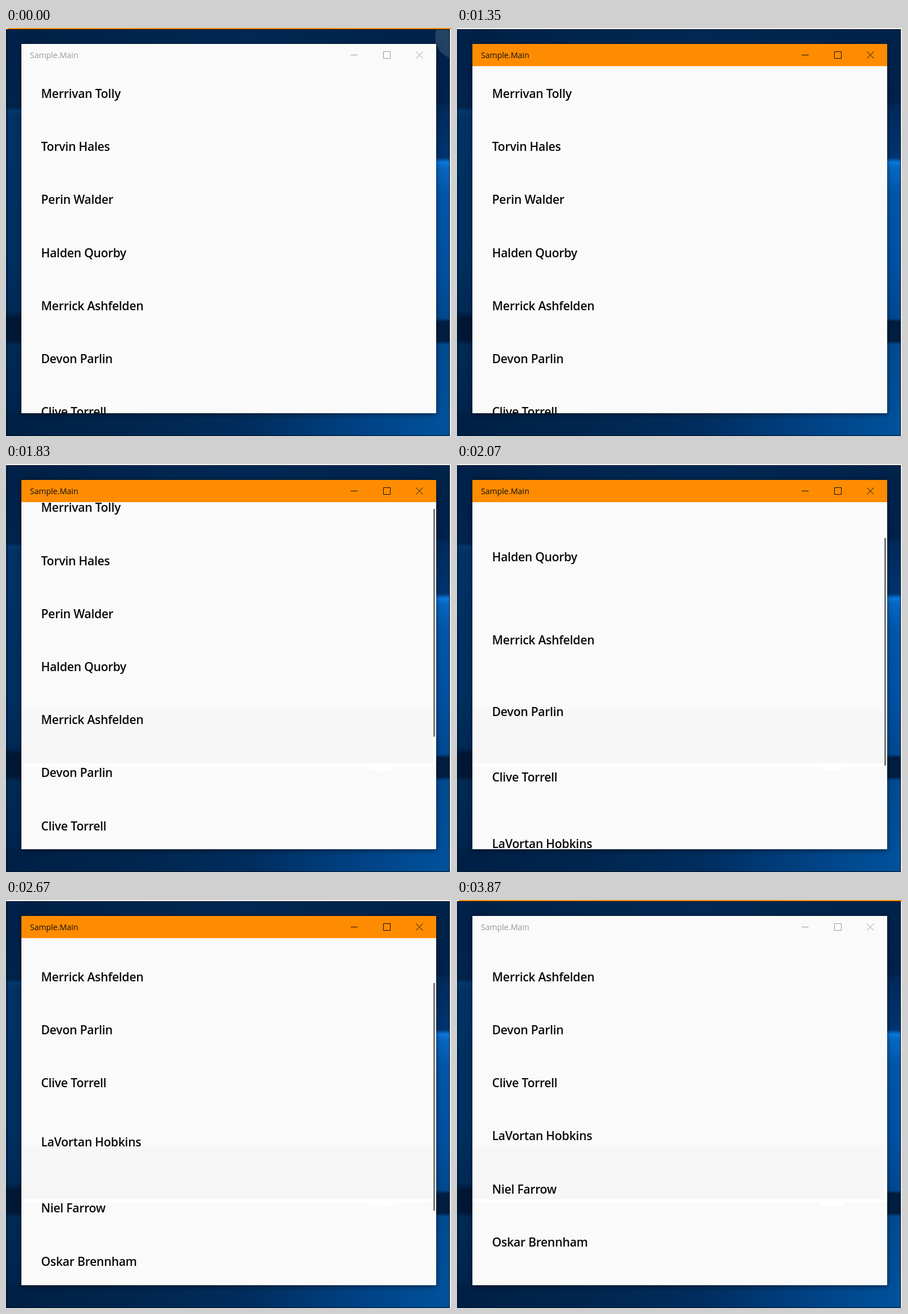
Recreate the animation shown at these times as an HTML page. Size 781x717 px, loop 3930 ms.

```html
<!DOCTYPE html>
<html lang="en">
<head>
<meta charset="utf-8">
<title>Staggered list scroll</title>
<style>
  html, body { margin: 0; width: 100%; height: 100%; overflow: hidden; }
  body { font-family: "Open Sans", "Noto Sans", sans-serif; background: #f0f0f0; }
  div, svg { position: absolute; }
  #stage { width: 781px; height: 717px; overflow: hidden; background: #f0f0f0; }
  #desk {
    left: 0; top: 2px; width: 779px; height: 715px; overflow: hidden;
    background: linear-gradient(90deg, #001f44, #00254f 30%, #002852 55%, #00214a);
  }
  #left {
    left: 0; top: 0; width: 27px; height: 715px;
    background: linear-gradient(#00214a, #00244c 138px, #04386f 143px, #003264 155px,
      #002f60 400px, #002a56 495px, #001734 508px, #001836 546px, #002a55 556px, #00224a);
  }
  #right {
    left: 755px; top: 0; width: 24px; height: 715px;
    background: linear-gradient(#00234a, #00214a 128px, #002a5a 136px, #003470 226px,
      #0a78dc 234px, #0866c0 244px, #0056a8 290px, #0050a0 420px, #00488f 508px,
      #001d40 514px, #001d40 548px, #004a90 554px, #00529c);
  }
  #floor {
    left: 0; top: 675px; width: 779px; height: 40px;
    background: linear-gradient(90deg, #001f45, #00264f 30%, #002d5e 55%, #004488 82%, #00529c);
  }
  #frame { left: 2px; top: 2px; width: 775px; height: 713px; border: 1px solid #04101f; border-bottom-width: 2px; box-sizing: content-box; }
  #outer { left: 3px; top: 0; width: 778px; height: 2px; }
  #spot { left: 753px; top: -25px; width: 78px; height: 78px; border-radius: 50%; background: #fff; }
  #win {
    left: 27px; top: 28px; width: 728px; height: 649px; background: #fafafa;
    box-shadow: 0 0 1px #000c, 0 2px 9px #0008;
  }
  #bar { width: 728px; height: 39px; }
  #title { left: 15px; top: 10px; font-size: 14px; line-height: 20px; }
  #icons { left: 0; top: 0; fill: none; stroke: currentColor; }
  #list { top: 39px; width: 728px; height: 610px; overflow: hidden; }
  #press { width: 728px; height: 610px; }
  #row { top: 365px; width: 722px; height: 94px; background: #f7f7f7; }
  #gap { top: 459px; width: 728px; height: 5px; background: #fff; }
  #dip { top: 459px; left: 580px; width: 100px; height: 20px; overflow: hidden; }
  #dip div { left: 7.5px; top: -73.5px; width: 87px; height: 87px; border-radius: 50%; background: #fff; }
  .name {
    left: 34.5px; top: 33px; white-space: pre; color: #0a0a0a;
    font-size: 21px; font-weight: 600; line-height: 30px; letter-spacing: -.3px;
  }
  #thumb { left: 722.5px; top: 0; width: 3px; height: 400px; background: #767676; }
</style>
</head>
<body>
<div id="stage">
  <div id="desk">
    <div id="left"></div><div id="right"></div><div id="floor"></div>
    <div id="spot"></div>
  </div>
  <div id="frame"></div>
  <div id="outer"></div>
  <div id="win">
    <div id="bar">
      <div id="title">Sample.Main</div>
      <svg id="icons" width="728" height="39">
        <path d="M578 19.5h12M635.5 13.5h12v12h-12zM692.5 13.5l12 12m0-12l-12 12"/>
      </svg>
    </div>
    <div id="list">
      <div id="press">
        <div id="row"></div><div id="gap"></div><div id="dip"><div></div></div>
      </div>
      <div id="thumb"></div>
    </div>
  </div>
</div>
<script>
const LOOP = 3930, STEP = 30, PITCH = 93.2, GLIDE = 1950;
const names = ["Merrivan Tolly", "Torvin Hales", "Perin Walder", "Halden Quorby",
  "Merrick Ashfelden", "Devon Parlin", "Clive Torrell", "LaVortan Hobkins",
  "Niel Farrow", "Oskar Brennham"];
// Lower rows follow the same glide more slowly; the last two also start later.
const rates = [1.8, 1.7, 1.6, 1.375, 1, .77, .63, .48, .65, .72];
const starts = { 8: 2235, 9: 2280 };
const glide = [52, 73, 103, 143, 179, 215, 248, 274, 296, 313, 328, 339, 346, 350, 352, 353];

const $ = id => document.getElementById(id);
const clamp = x => Math.max(0, Math.min(1, x));

const rows = names.map(text => {
  const row = document.createElement("div");
  row.className = "name";
  row.textContent = text;
  $("list").insertBefore(row, $("thumb"));
  return row;
});

function drag(t) {
  return 12 * clamp((t - 1500) / 90) ** 1.5 + 40 * clamp((t - 1590) / 360);
}

function offset(i, t) {
  const begin = starts[i] || GLIDE;
  if (t < begin) return drag(t);
  const x = Math.min((t - begin) * rates[i] / STEP, glide.length - 1);
  const k = Math.min(Math.floor(x), glide.length - 2);
  return glide[k] + (glide[k + 1] - glide[k]) * (x - k);
}

function draw(now) {
  const t = Math.floor(now % LOOP / STEP) * STEP;
  const active = t >= 1350 && t < 3840;

  $("bar").style.background = active ? "#ff8c00" : "#fafafa";
  $("bar").style.color = active ? "#111" : "#999";
  $("outer").style.background = active ? "#f4f4f4" : "#ff8c00";
  $("spot").style.opacity = .14 * clamp(1 - t / 60);
  $("press").style.opacity = clamp((t - 1410) / 90);

  rows.forEach((row, i) => {
    row.style.transform = `translateY(${i * PITCH - offset(i, t)}px)`;
  });
  $("thumb").style.transform = `translateY(${Math.round(3.4 + .214 * offset(0, t))}px)`;
  $("thumb").style.opacity = clamp((t - 1410) / 90) * clamp((3540 - t) / 120);
}

const origin = performance.now();
function tick() {
  draw(performance.now() - origin);
  requestAnimationFrame(tick);
}
tick();
</script>
</body>
</html>
```
